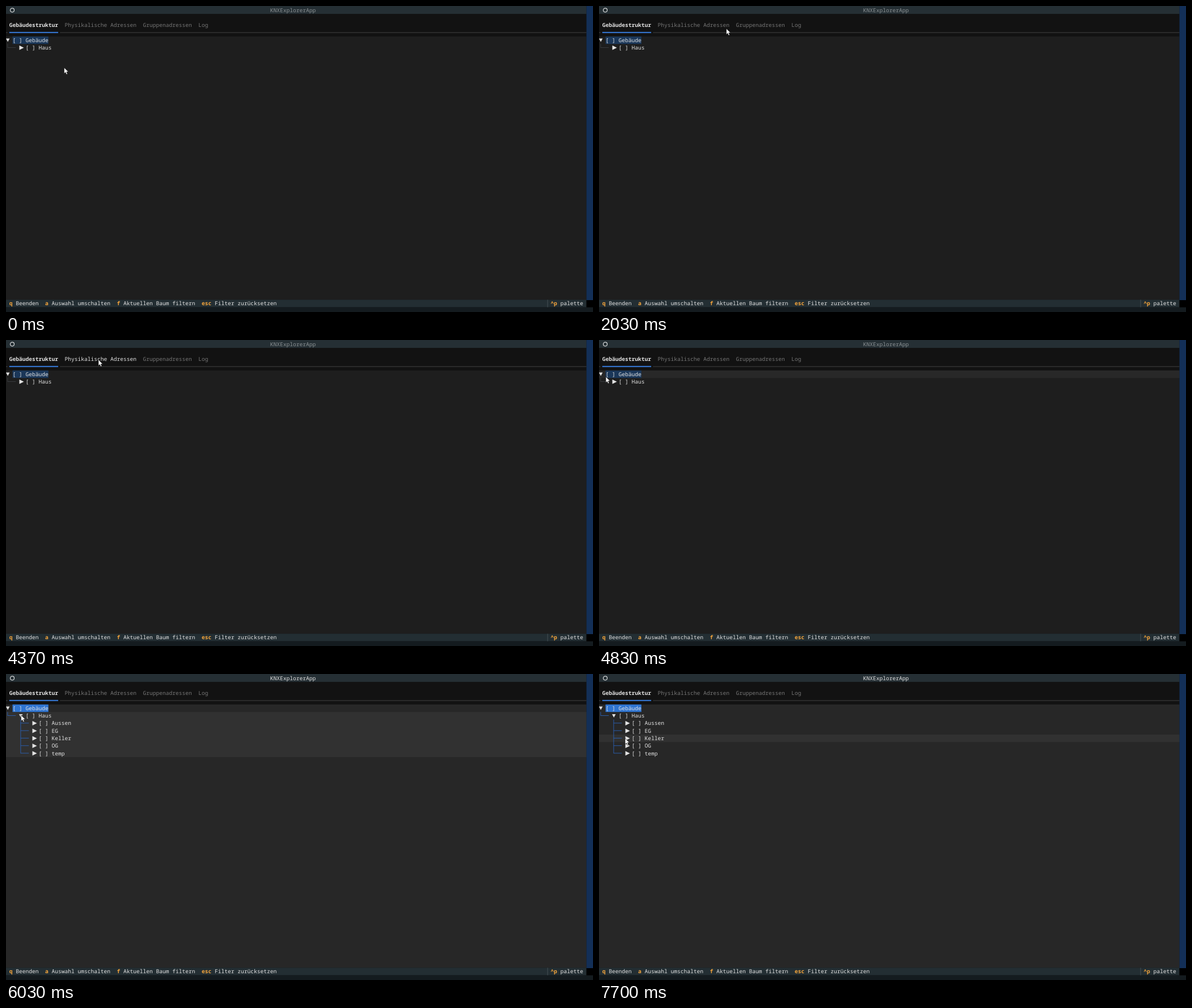
Animation of 1035x541 px, one loop 8 s. Source, as an HTML page:

```html
<!DOCTYPE html>
<html lang="de">
<head>
<meta charset="utf-8">
<title>KNXExplorerApp</title>
<style>
  html, body { margin: 0; width: 1035px; height: 541px; overflow: hidden; background: #121212; }
  svg { display: block; }
  text {
    font: 500 9.583px "Noto Sans Mono", "DejaVu Sans Mono", monospace;
    text-rendering: geometricPrecision;
    white-space: pre;
    fill: #e2e2e2;
  }
  .bold { font-weight: 700; }
  .key { font-weight: 700; fill: #f7a63c; }
  .dim { fill: #757575; }
  .title { fill: #8b9194; }
  .guide { fill: none; stroke: #383b3e; stroke-width: 1; }
  .mark { fill: #e2e2e2; }
  .focus .title { fill: #e2e2e2; }
  .focus .guide { stroke: #2b5ca8; }
</style>
</head>
<body>
<svg id="stage" width="1035" height="541" viewBox="0 0 1035 541"></svg>
<script>
const NS = "http://www.w3.org/2000/svg";
const stage = document.getElementById("stage");
const CELL = 5.75, ROW = 13.3, WIDTH = 1023.5;
const LOOP = 8000, OPEN_AT = 6030, STEP = 200 / 3;

const rowTop = r => 0.65 + r * ROW;
const rowMid = r => rowTop(r) + ROW / 2;

function add(tag, attrs, parent = stage) {
  const el = document.createElementNS(NS, tag);
  for (const k in attrs) el.setAttribute(k, attrs[k]);
  return parent.appendChild(el);
}

function rect(x, y, width, height, fill) {
  return add("rect", { x, y, width, height, fill });
}

function label(col, row, str, cls = "", parent) {
  const el = add("text", { x: col * CELL, y: rowTop(row) + 9.95, class: cls }, parent);
  el.textContent = str;
  return el;
}

function marker(col, row, open, parent) {
  const x = col * CELL, y = rowMid(row);
  const d = open
    ? `M${x} ${y - 2.9}h6.4l-3.2 6z`
    : `M${x + 0.5} ${y - 4}v8l8 -4z`;
  return add("path", { d, class: "mark" }, parent);
}

// Tree line below a node, with one arm per child row
function branch(col, first, last, parent) {
  const x = (col + 0.5) * CELL;
  let d = `M${x} ${rowTop(first)}V${rowMid(last)}`;
  for (let r = first; r <= last; r++) d += `M${x} ${rowMid(r) - 0.3}h${2.5 * CELL}`;
  add("path", { d, class: "guide" }, parent);
}

// Header and tabs
rect(0, 0, WIDTH, rowTop(1), "#252f34");
add("circle", { cx: 11, cy: 7.3, r: 3.5, fill: "none", stroke: "#d8dadb", "stroke-width": 1.2 });
label(81, 0, "KNXExplorerApp", "title");
label(1, 2, "Gebäudestruktur", "bold");
const addressTab = label(18, 2, "Physikalische Adressen", "dim");
label(42, 2, "Gruppenadressen", "dim");
label(59, 2, "Log", "dim");
rect(0, 46, WIDTH, 2, "#2a2a2a");
rect(2.9, 46, 92.3, 2, "#121212");
rect(CELL, 45.8, 15 * CELL, 2.1, "#3576d2");

// Tree
const treeTop = rowTop(4), treeEnd = rowTop(39);
const panel = rect(0, treeTop, WIDTH, treeEnd - treeTop, "#1e1e1e");
const hoverBar = rect(0, 0, WIDTH, ROW, "#282828");
const cursorBar = rect(2 * CELL, treeTop, 11 * CELL, ROW, "#1b3759");
branch(0, 5, 5);
marker(0, 4, true);
label(2, 4, "[ ] Gebäude");
const closedMark = marker(4, 5, false);
label(6, 5, "[ ] Haus");

const opened = add("g", {});
marker(4, 5, true, opened);
branch(4, 6, 10, opened);
["Aussen", "EG", "Keller", "OG", "temp"].forEach((name, i) => {
  marker(8, 6 + i, false, opened);
  label(10, 6 + i, "[ ] " + name, "", opened);
});

// Footer: each hint follows the last, the palette sits on the right
rect(0, treeEnd, WIDTH, ROW, "#232e33");
rect(0, treeEnd + ROW, 1035, 9, "#141b1f");

function hint(col, key, str) {
  label(col, 39, key, "key");
  label(col + key.length + 1, 39, str);
  return col + key.length + str.length + 3;
}
let col = 1;
col = hint(col, "q", "Beenden");
col = hint(col, "a", "Auswahl umschalten");
col = hint(col, "f", "Aktuellen Baum filtern");
hint(col, "esc", "Filter zurücksetzen");
hint(167, "^p", "palette");
rect(954.5, treeEnd, 1, ROW, "#465056");

// Window edge
rect(WIDTH, 0, 12, 520, "#132f57");
rect(WIDTH, 520, 12, 12.6, "#000");

const pointer = add("path", {
  d: "M0 0V10.4L2.4 8.2L4 12L5.9 11.2L4.3 7.5H7.6Z",
  fill: "#fff", stroke: "#111", "stroke-width": 0.6, "stroke-linejoin": "round"
});

// Pointer stops: time, x, y
const path = [
  [430, 102.5, 109], [1370, 152, 69], [1430, 171, 38], [1570, 230, 41.5],
  [1900, 230, 41.5], [2630, 199, 33],
  [4300, 199, 33], [4370, 163, 35], [4830, 12, 65], [5170, 30, 76], [5430, 26.5, 72.8],
  [6430, 26.5, 72.8], [7300, 36, 113], [7370, 36, 113], [7700, 46, 113.8]
];

function pointAt(t) {
  const i = path.findIndex(p => p[0] > t);
  if (i < 1) return path.at(i).slice(1);
  const [t0, x0, y0] = path[i - 1], [t1, x1, y1] = path[i];
  const k = (t - t0) / (t1 - t0);
  return [x0 + (x1 - x0) * k, y0 + (y1 - y0) * k];
}

// The screen refreshes 15 times a second
function snap(t) {
  const q = 500 + Math.floor((t - 495) / STEP) * STEP;
  return Math.round(q / 10) * 10;
}

const show = (el, on) => el.setAttribute("visibility", on ? "visible" : "hidden");

function draw(time) {
  const t = snap(time);
  const open = t >= OPEN_AT;
  const [x, y] = pointAt(t);
  pointer.setAttribute("transform", `translate(${x} ${y})`);

  // Hover reacts one refresh late
  const [hx, hy] = pointAt(t - STEP);
  const row = Math.floor((hy - rowTop(0)) / ROW);
  const onTab = row === 2 && hx > 17 * CELL && hx < 41 * CELL;
  addressTab.setAttribute("class", onTab ? "" : "dim");

  show(hoverBar, row >= 4 && row <= (open ? 10 : 5));
  hoverBar.setAttribute("y", rowTop(row));
  hoverBar.setAttribute("height", open && row === 5 ? 6 * ROW : ROW);
  hoverBar.setAttribute("fill", open ? "#313131" : "#282828");

  stage.setAttribute("class", open ? "focus" : "");
  panel.setAttribute("fill", open ? "#272727" : "#1e1e1e");
  cursorBar.setAttribute("fill", open ? "#2f74d0" : "#1b3759");
  show(opened, open);
  show(closedMark, !open);
}

const start = performance.now();
function tick() {
  draw((performance.now() - start) % LOOP);
  requestAnimationFrame(tick);
}
tick();
</script>
</body>
</html>
```
